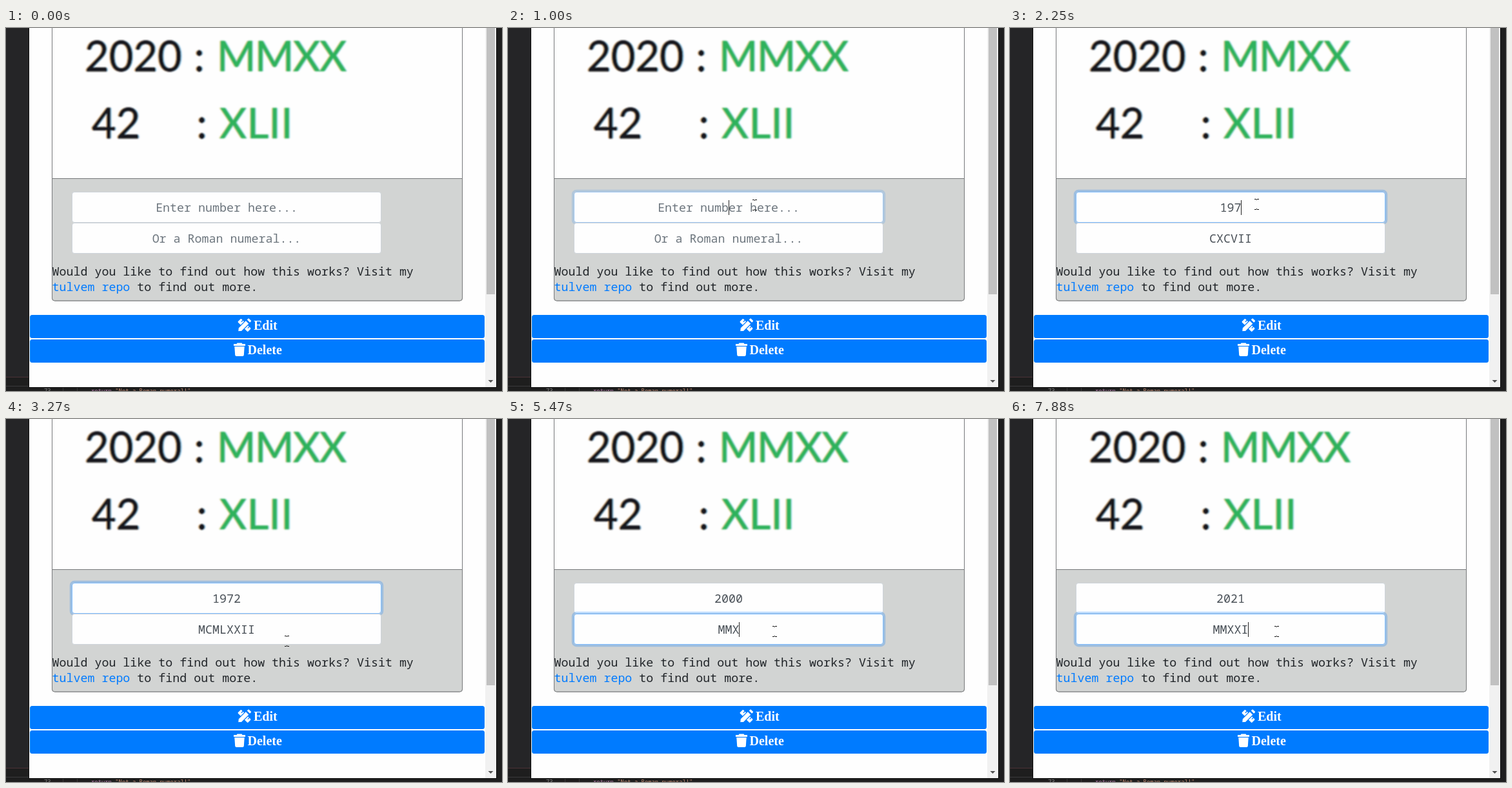
An HTML page for the animation above (8 s loop, 769 by 563 pixels).

```html
<!DOCTYPE html>
<html lang="en">
<head>
<meta charset="utf-8">
<title>Roman numeral converter</title>
<style>
html, body { margin: 0; width: 100%; height: 100%; overflow: hidden; background: #1e1e1e; }
svg { display: block; width: 769px; height: 563px; }
text { white-space: pre; }
.mono { font: 18.326px "Noto Sans Mono", "DejaVu Sans Mono", monospace; fill: #212529; }
.mid { text-anchor: middle; }
.code { font: 8.9px "Noto Sans Mono", "DejaVu Sans Mono", monospace; }
.btn { font: bold 20px "Liberation Serif", "Times New Roman", serif; fill: #fff; }
.big { font: 65px Lato, Carlito, sans-serif; }
.link { fill: #007bff; }
.crisp { shape-rendering: crispEdges; }
.box { fill: #fefefe; stroke: #ced4da; }
.ring rect { fill: none; }
</style>
</head>
<body>
<svg viewBox="0 0 769 563">
  <defs>
    <filter id="soft" x="-5%" y="-10%" width="110%" height="120%"><feGaussianBlur stdDeviation="0.8"/></filter>
    <g id="digits" class="big">
      <text x="122" y="67">2020</text><text x="291.500" y="67">:</text>
      <text x="133" y="171">42</text><text x="295.500" y="171">:</text>
    </g>
    <g id="romans" class="big">
      <text x="327" y="67" letter-spacing="-1.300">MMXX</text>
      <text x="331" y="171" letter-spacing="0.500">XLII</text>
    </g>
  </defs>

  <!-- editor behind the window -->
  <rect width="769" height="563" fill="#1e1e1e"/>
  <rect width="35" height="541" fill="#252527"/>
  <g class="crisp">
    <rect y="541" width="35" height="1" fill="#4b3236"/>
    <rect y="555" width="35" height="1" fill="#3a3a3c"/>
    <rect x="88" y="558" width="1" height="5" fill="#383838"/>
    <rect x="110" y="558" width="1" height="5" fill="#383838"/>
  </g>
  <text class="code" x="59" y="566" fill="#858585">73</text>
  <text class="code" x="132" y="566" fill="#c08a72"><tspan fill="#b07aa8">return</tspan> "Not a Roman numeral!"</text>

  <!-- browser window -->
  <g class="crisp">
    <rect x="35" width="726" height="558" fill="#0d0d0d"/>
    <rect x="36" width="707" height="557" fill="#fefefe"/>
    <rect x="743" width="17" height="557" fill="#f1f1f1"/>
    <rect x="745" width="13" height="413" fill="#c1c1c1"/>
  </g>
  <path d="M747.500 546h8l-4 4z" fill="#505050"/>

  <path d="M71.500 0V419a4 4 0 0 0 4 4H703.500a4 4 0 0 0 4-4V0" fill="#fefefe" stroke="#77797b"/>
  <path d="M71.500 233.500V419a4 4 0 0 0 4 4H703.500a4 4 0 0 0 4-4V233.500z" fill="#d2d4d3" stroke="#77797b"/>

  <g filter="url(#soft)">
    <g fill="#f3bd78" opacity=".75" transform="translate(-1.800 0)"><use href="#digits"/></g>
    <g fill="#86c8f2" opacity=".75" transform="translate(1.800 0)"><use href="#digits"/></g>
    <g fill="#15131c" stroke="#15131c" stroke-width=".8"><use href="#digits"/></g>
    <g fill="#e8cf7c" opacity=".75" transform="translate(-1.800 0)"><use href="#romans"/></g>
    <g fill="#8fdcec" opacity=".75" transform="translate(1.800 0)"><use href="#romans"/></g>
    <g fill="#2fb25c" stroke="#2fb25c" stroke-width=".6"><use href="#romans"/></g>
  </g>

  <g id="fields"></g>

  <text class="mono" x="71.500" y="384">Would you like to find out how this works? Visit my</text>
  <text class="mono" x="71.500" y="408"><tspan class="link">tulvem repo</tspan> to find out more.</text>

  <g fill="#007bff">
    <rect x="37" y="445" width="705" height="36" rx="3.500"/>
    <rect x="37" y="483" width="705" height="36" rx="3.500"/>
  </g>
  <g fill="#fff">
    <g transform="translate(369.500 461)" stroke="#007bff">
      <g transform="rotate(45)">
        <rect x="-11" y="-3.700" width="22" height="7.400" rx="1.200" stroke="none"/>
        <path d="M-7-4v3.500M7-4v3.500" stroke-width="1.300"/>
      </g>
      <path transform="rotate(-45)" d="M-14 0L-9.500-3.700H7V3.700H-9.500zM8.500-3.700H11.500a1.500 1.500 0 0 1 1.500 1.500V2.200a1.500 1.500 0 0 1-1.500 1.500H8.500z" stroke-width="1.200"/>
    </g>
    <path d="M358.500 488.500h7l1 1.500h4.500v3h-18v-3h4.500zM354.300 494h15.400l-.9 13.300a2 2 0 0 1-2 1.700h-9.600a2 2 0 0 1-2-1.700z"/>
  </g>
  <text class="btn" x="384" y="468">Edit</text>
  <text class="btn" x="374.500" y="506">Delete</text>

  <path id="beam" class="crisp" d="M-3-8h3v1h1v-1h3v1h-3v1h-1v13h1v1h3v1h-3v-1h-1v1h-3v-1h3v-1h0v-13h0v-1h-3z" fill="#111"/>
  <path id="arrow" d="M0 0V16l3.700-3.500 2.600 6 2.500-1.100-2.600-5.800h5.200z" fill="#fff" stroke="#000"/>
</svg>

<script>
const LOOP = 8000, MID = 342, CHAR = 11, BLINK = 530;
const $ = id => document.getElementById(id);

// [time, value]: each value holds until the next
const number = [[0, ""], [1800, "1"], [2030, "19"], [2250, "197"], [2500, "1972"],
  [4910, "1000"], [5070, "2000"], [5530, "2010"], [5710, "2020"], [7880, "2021"]];
const roman = [[0, ""], [1860, "I"], [2090, "XIX"], [2250, "CXCVII"], [2590, "MCMLXXII"],
  [4840, "M"], [4990, "MM"], [5470, "MMX"], [5640, "MMXX"], [7730, "MMXXI"]];
const ringA = [[0, 0], [1000, .6], [1080, 1], [3530, .4], [3600, 0]];
const ringB = [[0, 0], [3530, .6], [3600, 1]];
const selected = [[0, false], [3740, true], [4840, false]];
// field in focus and the moment its caret last restarted
const caret = [[0, null], [1000, [0, 950]], [1800, [0, 1800]], [2030, [0, 2030]], [2250, [0, 2250]],
  [2500, [0, 2510]], [3530, [1, 3530]], [4840, [1, 4840]], [4990, [1, 4990]], [5470, [1, 5470]],
  [5640, [1, 5640]], [7730, [1, 7730]]];
// [time, x, y], moved between linearly
const mouse = [[150, 447, 556], [300, 428, 468], [460, 407, 374], [620, 391, 305], [780, 383, 277],
  [860, 382, 274], [1229, 382, 274], [1230, 382, 273], [3040, 382, 273], [3110, 396, 289],
  [3200, 424, 330], [3270, 435, 344], [3340, 432, 343], [3480, 413, 329], [8000, 413, 329]];

function at(steps, t) {
  let value = steps[0][1];
  for (const [time, v] of steps) if (time <= t) value = v;
  return value;
}

function mouseAt(t) {
  const i = mouse.findIndex(p => p[0] > t);
  const [t0, x0, y0] = mouse[i - 1], [t1, x1, y1] = mouse[i];
  const k = (t - t0) / (t1 - t0);
  return [Math.round(x0 + (x1 - x0) * k), Math.round(y0 + (y1 - y0) * k)];
}

function makeField(y, hint) {
  const g = document.createElementNS("http://www.w3.org/2000/svg", "g");
  g.innerHTML = `
    <rect class="box" x="102.5" y="${y + .5}" width="479" height="47" rx="3.5"/>
    <g class="ring">
      <rect x="100.4" y="${y - 1.6}" width="483.2" height="51.2" rx="5.6" stroke="#007bff" stroke-opacity=".25" stroke-width="3.2"/>
      <rect x="102.5" y="${y + .5}" width="479" height="47" rx="3.5" stroke="#80bdff"/>
    </g>
    <rect class="crisp" y="${y + 13}" height="23" fill="#3390ff"/>
    <text class="mono mid" x="${MID}" y="${y + 31}"></text>
    <rect class="crisp" y="${y + 13}" width="1" height="23" fill="#222"/>`;
  $("fields").append(g);
  const [, ring, mark, label, bar] = g.children;
  return (text, glow, picked, caretOn) => {
    const half = text.length * CHAR / 2;
    label.textContent = text || hint;
    label.style.fill = picked ? "#fff" : text ? "#495057" : "#6c757d";
    ring.setAttribute("opacity", glow);
    mark.setAttribute("x", MID - half);
    mark.setAttribute("width", picked ? half * 2 : 0);
    bar.setAttribute("x", Math.floor(MID + half));
    bar.setAttribute("opacity", caretOn && !picked ? 1 : 0);
  };
}

const drawNumber = makeField(254, "Enter number here...");
const drawRoman = makeField(302, "Or a Roman numeral...");

function place(el, show, x, y) {
  el.setAttribute("visibility", show ? "visible" : "hidden");
  el.setAttribute("transform", `translate(${x} ${y})`);
}

function draw(t) {
  const focus = at(caret, t);
  const lit = focus && Math.floor((t - focus[1]) / BLINK) % 2 === 0;
  drawNumber(at(number, t), at(ringA, t), false, lit && focus[0] === 0);
  drawRoman(at(roman, t), at(ringB, t), at(selected, t), lit && focus[0] === 1);

  const shown = t >= 150;
  const [x, y] = mouseAt(Math.max(t, 150));
  place($("beam"), shown && y <= 424, x, y);
  place($("arrow"), shown && y > 424, x, y);
}

function frame() {
  draw(performance.now() % LOOP);
  requestAnimationFrame(frame);
}
frame();
</script>
</body>
</html>
```
